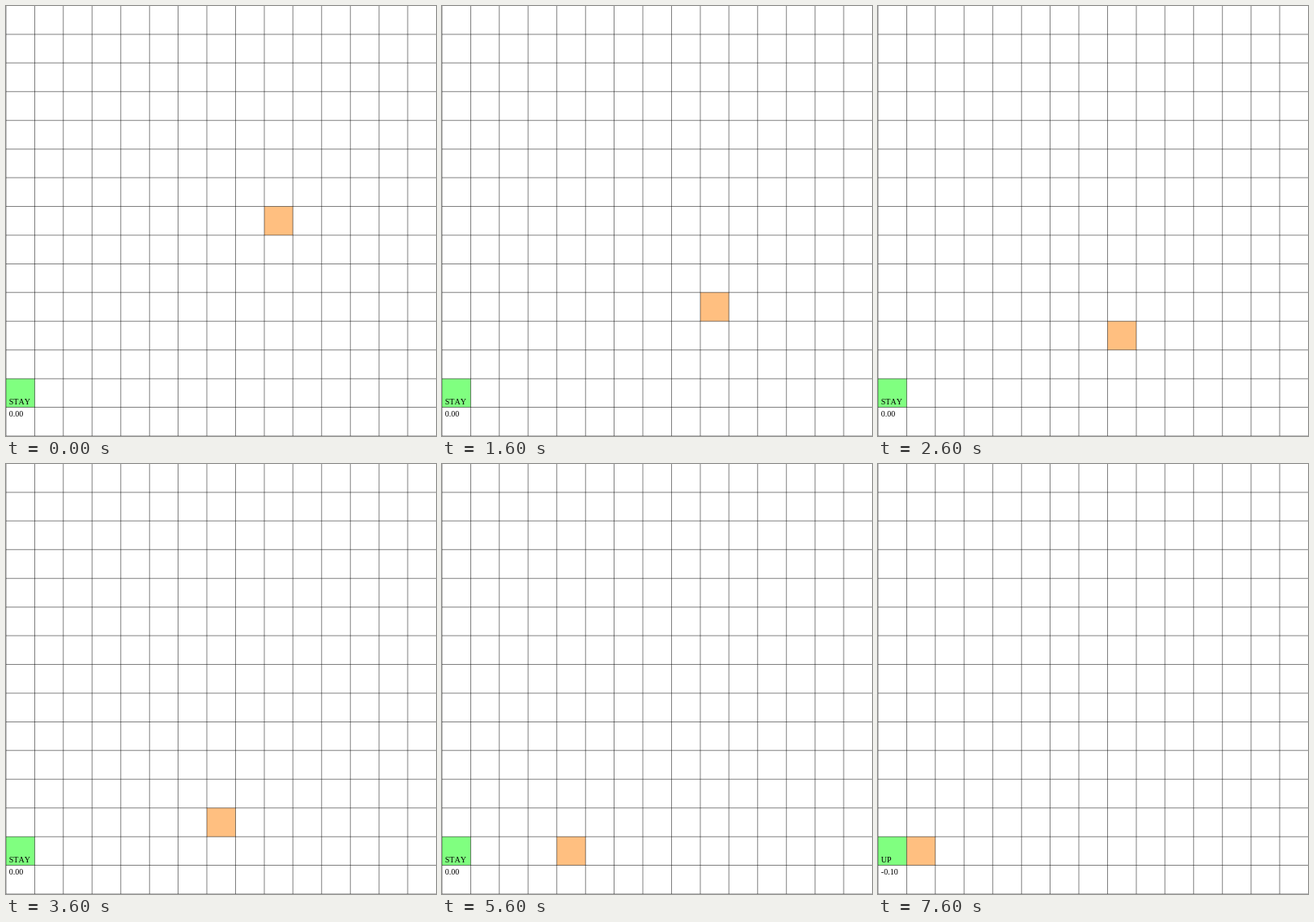
Animation, 531 px wide and 531 px high, one loop 8 s. Source, as an HTML page:

```html
<!DOCTYPE html>
<html lang="en">
<head>
<meta charset="utf-8">
<title>Grid walk</title>
<style>
  html, body { margin: 0; width: 100%; height: 100%; overflow: hidden; background: #fff; }
  svg { display: block; width: 100%; height: 100%; }
  text { font: 10px "Liberation Serif", serif; font-kerning: none; fill: #000; }
</style>
</head>
<body>
<svg viewBox="0 0 531 531">
  <rect id="home" fill="#80ff80"/>
  <rect id="walker" fill="#ffbf80"/>
  <path id="grid" fill="none" stroke="#000" stroke-width="0.5"/>
  <text id="action" x="3.8" y="492"></text>
  <text id="reward" x="3.8" y="506.5"></text>
</svg>
<script>
const SIZE = 531, CELLS = 15;
const CELL = 72 * 1.25 / 2.54; // 1.25 cm in points
const LOOP = 8000, FIRST = 600, STEP = 500, LAST = 7600;
const START = [9, 7];
const MOVES = "DDDDLDLLLDLLL";

const el = id => document.getElementById(id);
const set = (node, attrs) => {
  for (const key in attrs) node.setAttribute(key, attrs[key]);
};

// Edges sit on quarter pixels; rows are measured from the bottom.
const snap = v => Math.round(v * 4) / 4;
const colX = col => snap(col * CELL);
const rowY = row => snap(SIZE - (CELLS - row) * CELL);

function place(node, col, row) {
  const x = colX(col), y = rowY(row);
  set(node, { x, y, width: colX(col + 1) - x, height: rowY(row + 1) - y });
}

function drawGrid() {
  let d = "";
  for (let i = 0; i <= CELLS; i++) {
    d += `M${colX(i)} 0V${SIZE}M0 ${rowY(i)}H${SIZE}`;
  }
  set(el("grid"), { d });
}

function walkerAt(t) {
  const count = t < FIRST ? 0 : Math.floor((t - FIRST) / STEP) + 1;
  let [col, row] = START;
  for (const move of MOVES.slice(0, count)) {
    if (move === "D") row++;
    else col--;
  }
  // The final step comes after a longer pause.
  if (t >= LAST) col--;
  return [col, row];
}

function render(t) {
  const done = t >= LAST;
  place(el("walker"), ...walkerAt(t));
  el("action").textContent = done ? "UP" : "STAY";
  el("reward").textContent = done ? "-0.10" : "0.00";
}

drawGrid();
place(el("home"), 0, 13);
render(0);

let origin;
function tick(now) {
  origin ??= now;
  render((now - origin) % LOOP);
  requestAnimationFrame(tick);
}
requestAnimationFrame(tick);
</script>
</body>
</html>
```
